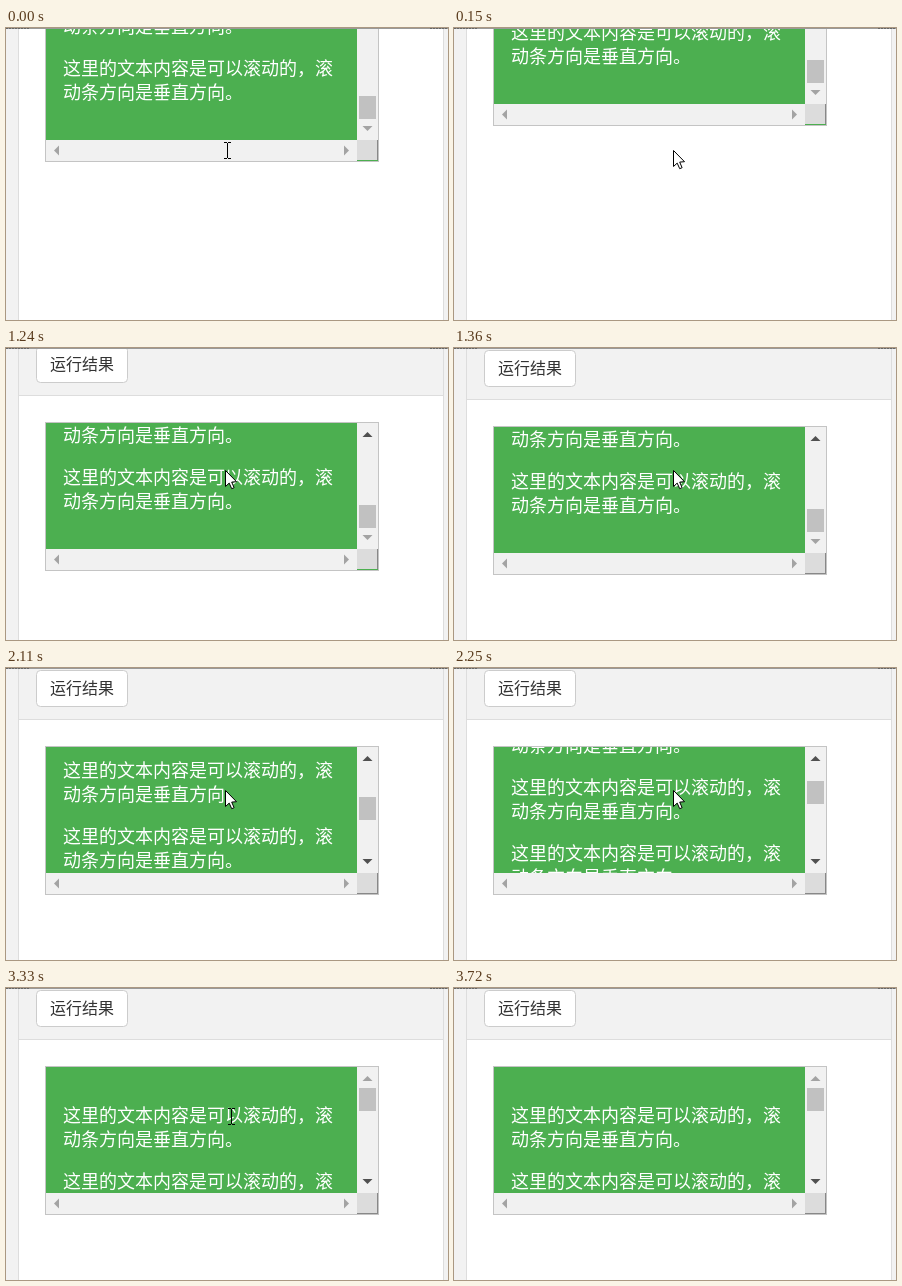
These frames come from a looping animation (442 by 292 pixels, 4.31 s). An HTML page with a canvas:

```html
<!DOCTYPE html>
<html lang="zh">
<head>
<meta charset="utf-8">
<style>
html, body { margin: 0; overflow: hidden; }
canvas { display: block; }
</style>
</head>
<body>
<canvas id="stage" width="442" height="292"></canvas>
<script>
const ctx = document.getElementById('stage').getContext('2d');
const LOOP = 4310, MAX_SCROLL = 324;
const FONT = '"Noto Sans CJK SC", "Noto Sans CJK", sans-serif';
const GREEN = '#4caf50', BAR = '#f1f1f1', ON = '#505050', OFF = '#a3a3a3';

// start ms, page scroll, box scroll, pointer, x, y
const steps = [
  [0, 93, 324, 'beam', 221, 122],
  [150, 129, 324, 'arrow', 219, 122],
  [1090, 99, 324, 'arrow', 219, 122],
  [1240, 4, 324, 'arrow', 219, 122],
  [1360, 0, 324, 'arrow', 219, 122],
  [2110, 0, 157, 'arrow', 219, 122],
  [2250, 0, 74, 'arrow', 219, 122],
  [2620, 0, 65, 'arrow', 219, 122],
  [2770, 0, 0, 'arrow', 219, 122],
  [3330, 0, 0, 'beam', 225, 128],
  [3450, 0, 0, 'arrow', 262, 206],
  [3570, 0, 0, 'arrow', 345, 251],
  [3720, 0, 0, 'none', 0, 0]
];

function rect(x, y, w, h, color) {
  ctx.fillStyle = color;
  ctx.fillRect(x, y, w, h);
}

function text(str, x, y, size, color) {
  ctx.font = size + 'px ' + FONT;
  ctx.fillStyle = color;
  ctx.fillText(str, x, y);
}

function shape(points, x, y) {
  ctx.beginPath();
  points.forEach(([px, py]) => ctx.lineTo(x + px, y + py));
  ctx.closePath();
}

function triangle(x, y, dx, dy, color) {
  const tip = [dx * 2.5, dy * 2.5];
  const a = [-dx * 2.5 + dy * 5, -dy * 2.5 + dx * 5];
  const b = [-dx * 2.5 - dy * 5, -dy * 2.5 - dx * 5];
  shape([tip, a, b], x, y);
  ctx.fillStyle = color;
  ctx.fill();
}

function header() {
  rect(13, 0, 424, 51, '#f2f2f2');
  rect(13, 51, 424, 1, '#ddd');
  ctx.beginPath();
  ctx.roundRect(30.5, 2.5, 91, 36, 4);
  ctx.fillStyle = '#fff';
  ctx.fill();
  ctx.strokeStyle = '#ccc';
  ctx.lineWidth = 1;
  ctx.stroke();
  text('运行结果', 44, 26, 16, '#333');
}

function box(scroll, moved) {
  rect(39, 78, 334, 149, '#c4c4c4');
  rect(40, 79, 311, 126, GREEN);
  ctx.save();
  ctx.beginPath();
  ctx.rect(40, 79, 311, 126);
  ctx.clip();
  for (let i = 0; i < 6; i++) {
    const y = 134 + 66 * i - scroll;
    text('这里的文本内容是可以滚动的，滚', 57, y, 18, '#fff');
    text('动条方向是垂直方向。', 57, y + 24, 18, '#fff');
  }
  ctx.restore();

  rect(351, 79, 21, 126, BAR);
  rect(353, 100 + Math.floor(61 * scroll / MAX_SCROLL), 17, 23, '#c1c1c1');
  triangle(361.5, 90.5, 0, -1, scroll > 0 ? ON : OFF);
  triangle(361.5, 193.5, 0, 1, scroll < MAX_SCROLL ? ON : OFF);
  rect(40, 205, 311, 21, BAR);
  triangle(50.5, 215.5, -1, 0, OFF);
  triangle(340.5, 215.5, 1, 0, OFF);
  rect(351, 205, 21, 21, '#dcdcdc');
  rect(371, 205, 1, 21, '#888');
  rect(351, 225, 21, 1, moved ? GREEN : '#888');
}

function pointer(kind, x, y) {
  if (kind === 'beam') {
    rect(x, y - 7, 1, 15, '#000');
    for (const dy of [-8, 8]) {
      rect(x - 3, y + dy, 3, 1, '#000');
      rect(x + 1, y + dy, 3, 1, '#000');
    }
  } else if (kind === 'arrow') {
    shape([[0, 0], [0, 16], [3.7, 12.6], [6.2, 18.2], [8.6, 17.2], [6.2, 11.6], [11, 11.2]], x + .5, y + .5);
    ctx.fillStyle = '#fff';
    ctx.fill();
    ctx.strokeStyle = '#000';
    ctx.lineWidth = 1;
    ctx.stroke();
  }
}

function topEdge() {
  rect(0, 0, 442, 1, '#999');
  for (let x = 0; x < 22; x += 3) rect(x, 0, 2, 1, '#666');
  for (let x = 424; x < 442; x += 3) rect(x, 0, 2, 1, '#666');
}

function draw(now) {
  const t = now % LOOP;
  const [, page, scroll, kind, x, y] = steps.findLast(s => s[0] <= t);
  rect(0, 0, 442, 292, '#f2f2f2');
  rect(12, 0, 426, 292, '#ddd');
  rect(13, 0, 424, 292, '#fff');
  ctx.save();
  ctx.translate(0, -page);
  header();
  box(scroll, page > 0);
  ctx.restore();
  topEdge();
  pointer(kind, x, y);
  requestAnimationFrame(draw);
}
requestAnimationFrame(draw);
</script>
</body>
</html>
```
